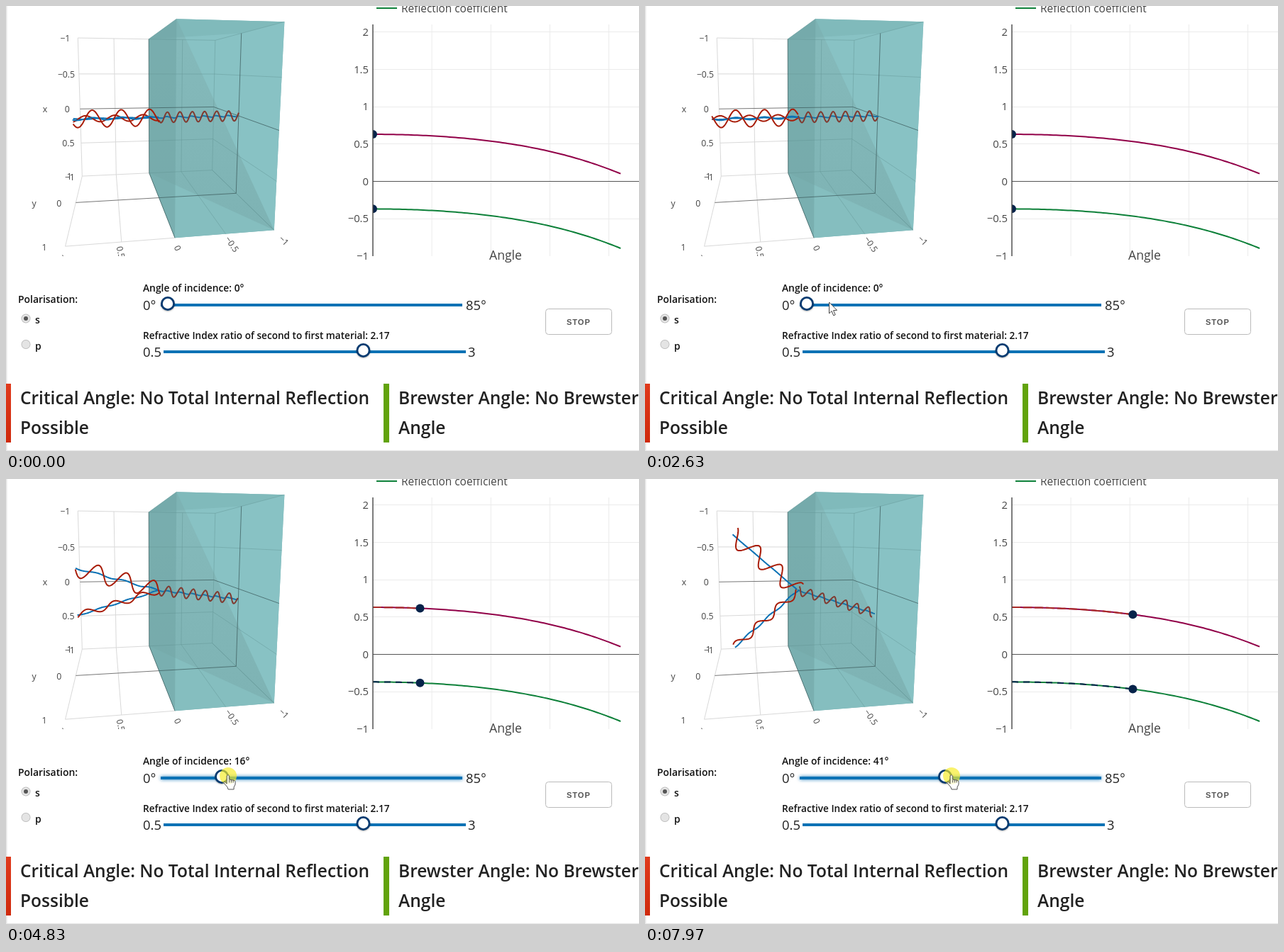
Write an HTML page with a canvas that moves like this. It is 892 px wide and 628 px high and loops after 8 s.

```html
<!DOCTYPE html>
<html lang="en">
<head>
<meta charset="utf-8">
<title>Reflection and refraction</title>
<style>
html, body { margin: 0; width: 100%; height: 100%; overflow: hidden; background: #fff; }
canvas { display: block; }
</style>
</head>
<body>
<canvas id="stage" width="892" height="628"></canvas>
<script>
const ctx = document.getElementById('stage').getContext('2d');
const LOOP = 8000, TICK = 78.5, FIRST = 34, DRAG = 3250;
const N = 2.17, TAU = Math.PI * 2;
const SANS = '"Open Sans", "Noto Sans", sans-serif';
const BLUE = '#0b72b5', RED = '#a81c08', NAVY = '#06234a';
const HALVES = [-1, -.5, 0, .5, 1];

// Time against wave cycles and angle of incidence
const phaseKeys = [[0, .655], [1850, 4.35], [3490, 7.43], [4830, 9.74], [5860, 11.89], [7970, 15.97]];
const angleKeys = [[3400, 0], [4830, 16], [5860, 22], [6640, 28], [7110, 35], [7970, 41]];

function keyed(keys, t) {
  if (t <= keys[0][0]) return keys[0][1];
  const i = keys.findIndex(k => t <= k[0]);
  if (i < 0) return keys[keys.length - 1][1];
  const [t0, a] = keys[i - 1], [t1, b] = keys[i];
  return a + (b - a) * (t - t0) / (t1 - t0);
}

const heldTime = t => Math.max(0, FIRST + TICK * Math.floor((t - FIRST) / TICK));
const thumbX = deg => 228 + deg * 4.756;

function pointerAt(t, deg) {
  if (t >= DRAG) return [Math.max(259, thumbX(deg) + 9), 419];
  const left = Math.max(0, 1 - (t - 70) / 2100);
  return [259 + 486 * left ** 1.55, 418 + 215 * left ** 2.1];
}

function path(points, close) {
  ctx.beginPath();
  for (const [x, y] of points) ctx.lineTo(x, y);
  if (close) ctx.closePath();
}
function line(points, color, width = 1) {
  path(points);
  ctx.strokeStyle = color;
  ctx.lineWidth = width;
  ctx.stroke();
}
function fill(points, color) {
  path(points, true);
  ctx.fillStyle = color;
  ctx.fill();
}
function disc(x, y, r, color) {
  ctx.beginPath();
  ctx.arc(x, y, r, 0, TAU);
  ctx.fillStyle = color;
  ctx.fill();
}
function text(str, x, y, size, color = '#222', weight = 400, align = 'left') {
  ctx.font = `${weight} ${size}px ${SANS}`;
  ctx.fillStyle = color;
  ctx.textAlign = align;
  ctx.fillText(str, x, y);
}
const label = (str, x, y, size, align) => text(String(str).replace('-', '−'), x, y, size, '#444', 400, align);
function clipped(x, y, w, h, draw) {
  ctx.save();
  ctx.beginPath();
  ctx.rect(x, y, w, h);
  ctx.clip();
  draw();
  ctx.restore();
}
function fade(y0, y1, from, to) {
  const g = ctx.createLinearGradient(0, y0, 0, y1);
  g.addColorStop(0, from);
  g.addColorStop(1, to);
  return g;
}

// Perspective: u down, v towards the viewer, s to the right
function project(u, v, s) {
  const w = .803 + .027 * u - .197 * v + .0315 * s;
  return [(173.2 + 5.75 * u - 28.3 * v + 100.4 * s) / w,
          (126.3 + 98.3 * u - 17.5 * v + 3.1 * s) / w];
}
const poly = (...pts) => pts.map(p => project(...p));

function drawScene() {
  const light = '#d9d9d9', dark = '#777';
  const faint = 'rgba(95,145,146,.42)', firm = 'rgba(62,92,94,.75)';
  for (const h of HALVES) {
    line(poly([h, -1, -1], [h, -1, 0]), h ? light : dark);
    if (h < 0) line(poly([-1, -1, h], [1, -1, h], [1, 1, h]), light);
  }
  line(poly([1, 1, -1], [1, 1, 0]), light);
  line(poly([1, 0, -1], [1, 0, 0]), dark);

  const backTop = [-1, -1, 0], backLow = [1, -1, 0], nearTop = [-1, 1, 0], nearLow = [1, 1, 0];
  const farTop = [-1, 1, 1], farLow = [1, 1, 1];
  fill(poly(backTop, nearTop, farTop, farLow, nearLow, backLow), fade(60, 310, '#84b9ba', '#7eb3b4'));
  fill(poly(nearTop, farTop, farLow), '#88c2c4');
  fill(poly(nearTop, backTop, [-1, 0, 1], farTop), 'rgba(110,165,167,.3)');
  fill(poly(backLow, farLow, nearLow), '#85bebf');
  fill(poly(backTop, nearTop, nearLow, backLow), 'rgba(112,164,165,.55)');

  for (const h of HALVES) {
    if (h) line(poly([h, -1, 0], [h, -1, 1], [h, 1, 1]), faint);
    if (h > 0) line(poly([-1, -1, h], [1, -1, h], [1, 1, h]), faint);
  }
  line(poly([0, -1, 0], [0, -1, 1], [0, 1, 1]), firm);
  line(poly([1, 0, 0], [1, 0, 1], [-1, 0, 1]), firm);
  line(poly(nearTop, backTop), faint);
  line(poly(backTop, backLow, nearLow), firm);

  label('x', 55, 150, 12.3, 'center');
  label('y', 39.5, 283, 12.3, 'center');
  for (const u of HALVES) {
    const [x, y] = project(u, -1, -1);
    label(u, x - 18, y + 5, 12.3, 'center');
  }
  for (let v = -1; v <= 1; v++) {
    const [x, y] = project(1, v, -1);
    label(v, x - 23.5 - 6 * v, y + 5.5, 12.3, 'center');
  }
  clipped(0, 300, 450, 53, () => {
    for (const s of HALVES) {
      const [x, y] = project(1, 1, s);
      ctx.save();
      ctx.translate(x + 4 + 10 * s, y + 14.5);
      ctx.rotate((66 - 21 * s) * Math.PI / 180);
      label(s ? -s : 0, 0, 4.5, 12, 'center');
      ctx.restore();
    }
  });
}

// dir: ray direction (u, s); side: displacement direction (u, s)
function wave(dir, side, from, to, cycles, shift, ampB, ampE, red, blue) {
  const b = [], e = [];
  for (let i = 0; i <= 160; i++) {
    const r = from + (to - from) * i / 160;
    const c = Math.cos(TAU * (cycles * r - shift));
    const u = dir[0] * r, s = dir[1] * r;
    e.push(project(u, ampE * c, s));
    b.push(project(u + side[0] * ampB * c, 0, s + side[1] * ampB * c));
  }
  line(e, blue, 2);
  line(b, red, 2);
}

function drawWaves(deg, shift) {
  const a = deg * Math.PI / 180, si = Math.sin(a), co = Math.cos(a);
  const st = si / N, ct = Math.sqrt(1 - st * st);
  const t = transmit(deg), r = t - 1;
  wave([st, ct], [-ct, st], 0, 1, 3 * N, shift, .1 * t, -.1 * t, '#803a30', '#1872a6');
  wave([si, -co], [-co, -si], 0, 1, 3, shift - .08, -.1 * r, -.1 * r, RED, BLUE);
  wave([si, co], [-co, si], -1, 0, 3, shift, .1, -.1, RED, BLUE);
}

function transmit(deg) {
  const a = deg * Math.PI / 180, c = Math.cos(a);
  return 2 * c / (c + Math.sqrt(N * N - Math.sin(a) ** 2));
}

const chartX = deg => 517 + deg * 4.156;
const chartY = val => 247.5 - val * 105.3;

function drawChart(deg) {
  const curve = (offset, end) => {
    const pts = [];
    for (let d = 0; d <= end; d++) pts.push([chartX(d), chartY(transmit(d) - offset)]);
    return pts;
  };
  line([[522, 3], [551, 3]], '#0d8039', 2);
  label('Reflection coefficient', 557, 9, 15.4);
  clipped(517, 26, 375, 327, () => {
    for (let d = 20; d <= 80; d += 20) line([[chartX(d), 26], [chartX(d), 353]], '#ebebeb');
    for (let v = -.5; v <= 2; v += .5) {
      const y = Math.floor(chartY(v)) + .5;
      line([[517, y], [892, y]], v ? '#ebebeb' : '#555', v ? 1 : 1.2);
    }
    line(curve(0, 84), '#910048', 2);
    line(curve(1, 84), '#0d8039', 2);
    ctx.setLineDash([12, 4]);
    line(curve(0, deg), '#aa2a26', 2);
    ctx.setLineDash([9, 7]);
    line(curve(1, deg), NAVY, 2);
    ctx.setLineDash([]);
    for (const offset of [0, 1]) disc(chartX(deg), chartY(transmit(deg) - offset), 6, NAVY);
  });
  line([[517, 26], [517, 353]], '#444', 1.4);
  for (let v = -1; v <= 2; v += .5) label(v, 511, chartY(v) + 5, 14.8, 'right');
  label('Angle', 681, 357.5, 17.6);
}

function slider(x0, x1, y, thumb, glow) {
  ctx.save();
  if (glow) {
    ctx.shadowColor = '#0b72b5';
    ctx.shadowBlur = 5;
  }
  ctx.fillStyle = BLUE;
  ctx.fillRect(x0, y - 2, x1 - x0, 4);
  ctx.restore();
  ctx.save();
  ctx.shadowColor = 'rgba(0,0,0,.3)';
  ctx.shadowBlur = 2;
  ctx.shadowOffsetY = 1;
  disc(thumb, y - 2, 10, '#043a70');
  ctx.restore();
  disc(thumb, y - 2, 7.2, '#fff');
}

function radio(name, y, on) {
  disc(28, y, 6.5, '#b5b5b5');
  disc(28, y, 5.7, '#e4e4e4');
  if (on) disc(28, y, 3, '#555');
  text(name, 41, y + 7, 14, '#111', 600);
}

function note(color, x, width, first, second) {
  ctx.fillStyle = color;
  ctx.fillRect(x, 533, width, 83);
  text(first, x + width + 13, 562, 24.5, '#222', 600);
  text(second, x + width + 13, 604, 24.5, '#222', 600);
}

function drawPanel(deg, dragging) {
  text('Polarisation:', 17, 419, 13.9, '#111', 600);
  radio('s', 441, true);
  radio('p', 477.5, false);
  text(`Angle of incidence: ${deg}°`, 193, 403, 13.8, '#111', 600);
  text('0°', 193, 429, 18.4);
  text('85°', 648, 429, 18.4);
  slider(218, 643, 422, thumbX(deg), dragging);
  text('Refractive Index ratio of second to first material: 2.17', 193, 469.5, 13.6, '#111', 600);
  text('0.5', 193, 495, 18.4);
  text('3', 651, 495, 18.4);
  slider(222, 648, 488, 503.5, false);

  ctx.beginPath();
  ctx.roundRect(760.5, 427.5, 93, 36, 4);
  ctx.strokeStyle = '#bbb';
  ctx.lineWidth = 1;
  ctx.stroke();
  ctx.font = '700 11px "Liberation Sans", sans-serif';
  ctx.letterSpacing = '1px';
  ctx.fillStyle = '#555';
  ctx.fillText('STOP', 790, 450);
  ctx.letterSpacing = '0px';

  note(fade(533, 616, '#e03a1c', '#cf2a0c'), 0, 7, 'Critical Angle: No Total Internal Reflection', 'Possible');
  note('#62a30c', 532, 8, 'Brewster Angle: No Brewster', 'Angle');
}

function drawPointer([x, y], dragging) {
  ctx.save();
  ctx.translate(x, y);
  ctx.lineJoin = 'round';
  if (dragging) {
    disc(0, 0, 12, 'rgba(246,236,40,.68)');
    ctx.translate(-2, -2);
    const hand = new Path2D('M0 13V2Q1.8-1 3.6 2V7L11 8.5Q12.5 9 12 14L10 18V21H2L1 18L-4.5 11.5Q-3 9 0 13Z');
    ctx.fillStyle = 'rgba(255,255,255,.75)';
    ctx.fill(hand);
    ctx.strokeStyle = '#555';
    ctx.stroke(hand);
    for (let i = 0; i < 3; i++) line([[3.6 + 2.7 * i, 7.5], [3.6 + 2.7 * i, 11.5]], '#555');
  } else {
    const arrow = new Path2D('M.5 0V16L4 12.5L6.7 18.8L9.2 17.7L6.5 11.6L11.5 11.3Z');
    ctx.fillStyle = '#fff';
    ctx.fill(arrow);
    ctx.strokeStyle = '#444';
    ctx.lineWidth = 1;
    ctx.stroke(arrow);
  }
  ctx.restore();
}

function render(now) {
  const t = heldTime(now % LOOP);
  const deg = Math.round(keyed(angleKeys, t));
  const dragging = t >= DRAG;
  ctx.fillStyle = '#fff';
  ctx.fillRect(0, 0, 892, 628);
  ctx.fillStyle = '#e6e6e6';
  ctx.fillRect(0, 0, 1.5, 628);
  ctx.fillRect(0, 627, 892, 1);
  ctx.lineWidth = 1;
  drawScene();
  drawWaves(deg, keyed(phaseKeys, t));
  drawChart(deg);
  drawPanel(deg, dragging);
  if (t >= 70) drawPointer(pointerAt(t, deg), dragging);
}

let start;
function frame(now) {
  start ??= now;
  render(now - start);
  requestAnimationFrame(frame);
}
render(0);
requestAnimationFrame(frame);
</script>
</body>
</html>
```
